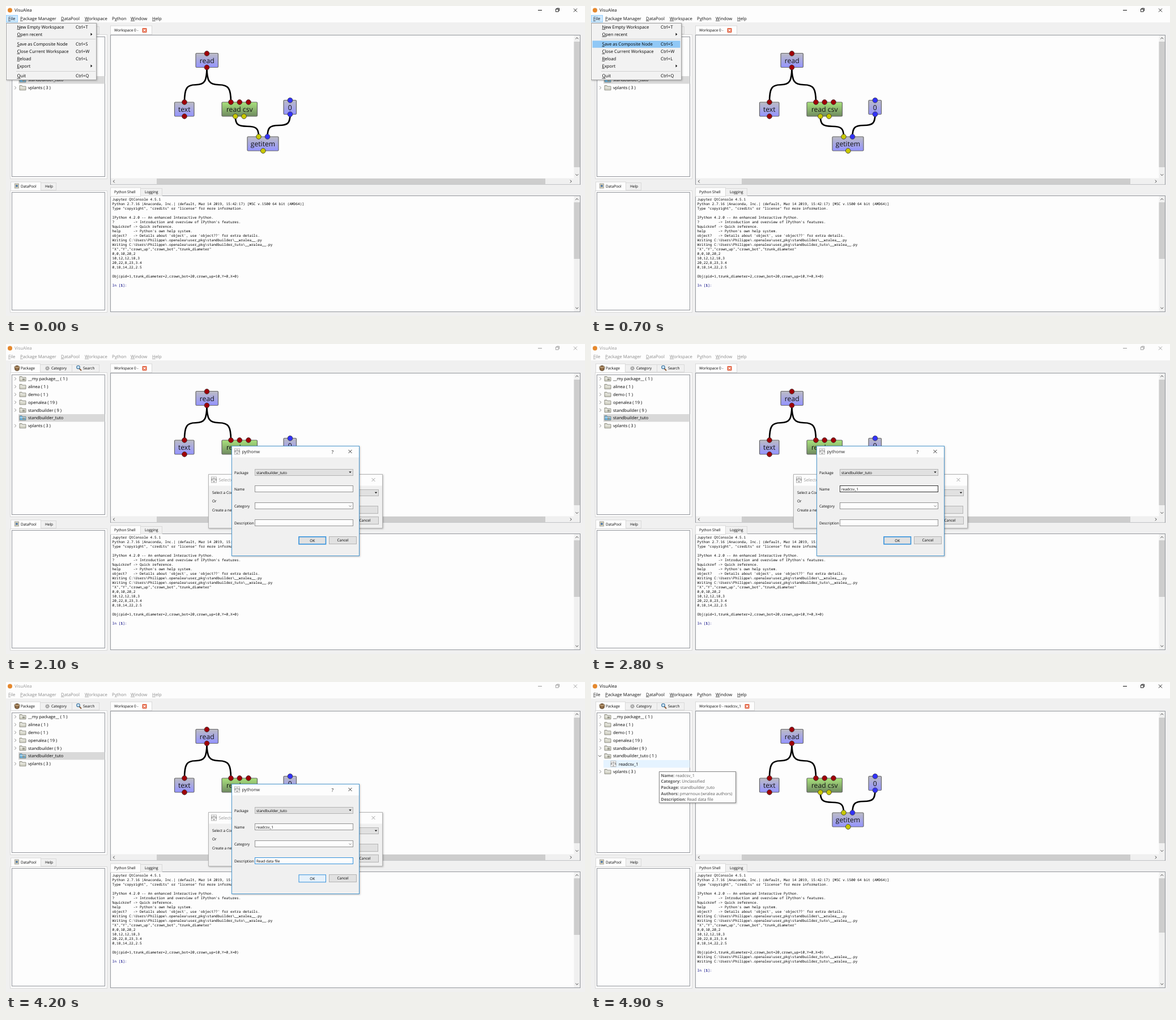
An HTML page that plays this animation: 1022 by 548 pixels, repeating every 5.6 s.

```html
<!DOCTYPE html>
<html lang="en">
<head>
<meta charset="utf-8">
<title>VisuAlea</title>
<style>
html, body { margin: 0; width: 100%; height: 100%; overflow: hidden; background: #f0f0f0; }
svg { display: block; }
text { font-family: "Open Sans", "Noto Sans", sans-serif; white-space: pre; text-rendering: geometricPrecision; }
.mono { font-family: "Noto Sans Mono", "DejaVu Sans Mono", monospace; }
.shadow { filter: drop-shadow(1px 1px 1.5px #0004); }
</style>
</head>
<body>
<svg id="stage" width="1022" height="548" viewBox="0 0 1022 548"></svg>
<script>
const STEP = 700, STEPS = 8;
const MENU = 7.75, SMALL = 6.5, TREE = 7.5, MONO = 6.21;
const BLUE = '#3592dc', GREY = '#b4b4b4', FIELD = '#929292', FRAME = '#92959b', WHITE = '#fdfdfd';

// Shape helpers; text is placed by its vertical centre, "&" underlines the next letter.
const rect = (x, y, w, h, fill, stroke = 'none', more = '') =>
  `<rect x="${x}" y="${y}" width="${w}" height="${h}" fill="${fill}" stroke="${stroke}" ${more}/>`;
const line = (d, stroke = '#333', width = 1, fill = 'none') =>
  `<path d="${d}" stroke="${stroke}" stroke-width="${width}" fill="${fill}"/>`;
const circle = (x, y, r, fill, more = '') => `<circle cx="${x}" cy="${y}" r="${r}" fill="${fill}" ${more}/>`;
const text = (x, y, s, size = SMALL, fill = '#000', more = '') =>
  `<text x="${x}" y="${y + size * .36}" font-size="${size}" fill="${fill}" ${more}>` +
  s.replace(/&(.)/, '<tspan text-decoration="underline">$1</tspan>') + '</text>';
const cross = (x, y, r, color = '#222', width = .9) =>
  line(`M${x - r} ${y - r}l${2 * r} ${2 * r}m0 ${-2 * r}l${-2 * r} ${2 * r}`, color, width);
const chevron = (x, y, angle, r = 2.4, color = '#444') =>
  `<g transform="translate(${x} ${y}) rotate(${angle})">${line(`M${-r / 2} ${-r}L${r / 2} 0L${-r / 2} ${r}`, color)}</g>`;
const caret = (x, y) => line(`M${x - 2.2} ${y - 1.2}h4.4l-2.2 2.5z`, 'none', 0, '#111');

const scales = (x, y) => rect(x - 4.5, y - 5, 9, 10, WHITE, '#999', 'stroke-width=".7"') +
  line(`M${x} ${y - 4}v7.5m-2 0h4M${x - 3.5} ${y - 2}h7l-1.3 3h2.6l-1.3-3m-7 0l-1 3h2.4z`, '#666', .6);
const folder = (x, y, tint, marked) =>
  line(`M${x} ${y + 4}v-8h4l1 1.5h6v6.5z`, '#77776b', .8, tint) + line(`M${x + .5} ${y - 1}h10`, '#fff', .8) +
  (marked ? rect(x + 5, y - .5, 4, 3, '#96968a') : '');

function titleBar(active, menuOpen) {
  const ink = active ? '#111' : '#999';
  const menu = active ? '#111' : '#8a8a8a';
  const items = [[4, '&File'], [25, '&Package Manager'], [97, '&DataPool'], [139, '&Workspace'],
    [187, 'P&ython'], [220, '&Window'], [258, '&Help']];
  return rect(0, 0, 1022, 29, WHITE) + circle(7, 7.5, 4, '#e5882d') + text(15, 7.5, 'VisuAlea', MENU, ink) +
    line('M939 7.5h7', ink) + rect(970.5, 5.5, 4.5, 4.5, 'none', ink, 'stroke-width=".9"') +
    line('M972 5V4h4.5v4.5h-1', ink, .9) + cross(1005, 7.5, 3, ink) +
    (menuOpen ? rect(.5, 16.5, 20, 12, '#cce8ff', '#99d1ff') : '') +
    items.map(([x, s]) => text(x, 22, s, MENU, menu)).join('');
}

const tab = (x, y, w, label, on, textX) =>
  rect(x, on ? y : y + 1.5, w, on ? 15.5 : 13, on ? WHITE : '#f0f0f0', '#d9d9d9') + text(textX, y + 8, label);
const pane = (x, y, w, h) => rect(x, y, w, h, '#fbfbfb', '#d9d9d9');
const frame = (x, y, w, h) => rect(x, y, w, h, WHITE, FRAME);

function tabs(saved) {
  const closeX = saved ? 275.5 : 244.5;
  return tab(60.5, 35, 56, 'Category', false, 80) + tab(116.5, 35, 48, 'Search', false, 136) +
    tab(8.5, 35, 52, 'Package', true, 26) +
    line('M15 40l4.5-2 4.5 2-1 6-3.5 1.5-3.5-1.5z', '#4a361e', .8, '#8f6c48') + line('M15 40l4.5 2 4.5-2', '#e5cfa6', 1) +
    circle(73, 43, 2.6, '#ccc', 'stroke="#888" stroke-width="2" stroke-dasharray="1.4 .8"') +
    line('M129 43l4 4', '#8a5a35', 1.8) + circle(127.5, 41, 2.8, '#cfe6f7', 'stroke="#356f9c" stroke-width="1.1"') +
    tab(184.5, 35, saved ? 104 : 73, saved ? 'Workspace 0 - readcsv_1' : 'Workspace 0 -', true, 191) +
    rect(closeX - 4, 39, 8, 8, '#e2603f', 'none', 'rx="1"') + cross(closeX, 43, 2, '#fff', 1.3) +
    tab(61.5, 311, 27, 'Help', false, 69) + tab(8.5, 311, 53, 'DataPool', true, 26) +
    rect(15.5, 314, 7, 8, '#d8d2b8', '#888', 'stroke-width=".7"') + circle(19, 318, 2, '#4d76a8') +
    tab(237.5, 321, 38, 'Logging', false, 245) + tab(184.5, 321, 53, 'Python Shell', true, 191);
}

function tree(saved) {
  const rows = ['__my package__ ( 1 )', 'alinea ( 1 )', 'demo ( 1 )', 'openalea ( 19 )', 'standbuilder ( 9 )',
    saved ? 'standbuilder_tuto ( 1 )' : 'standbuilder_tuto', 'vplants ( 3 )'];
  let out = saved ? rect(22, 138, 152.5, 13.5, '#e5f3ff') + scales(39.5, 144.8) + text(49, 144.8, 'readcsv_1', TREE)
    : rect(22, 124, 152.5, 13.5, '#d9d9d9');
  rows.forEach((label, i) => {
    const y = 61.5 + 13.85 * (saved && i > 5 ? i + 1 : i);
    const own = i == 0 || i == 4 || i == 5;
    if (i != 5) out += chevron(16.5, y, 0, 2.6, '#888');
    else if (saved) out += chevron(15.5, y, 90, 2.6);
    out += folder(24, y, i == 5 && !saved ? '#6cb2dd' : '#d6d6ca', own) + text(39, y, label, TREE);
  });
  return out;
}

function graph() {
  // Two mirrored bends that meet horizontally halfway.
  const edge = (x1, y1, x2, y2) => {
    const mx = (x1 + x2) / 2, my = (y1 + y2) / 2, dx = (mx - x1) * .2, dy = (my - y1) * .2;
    return line(`M${x1} ${y1}C${x1} ${my - dy} ${x1 + dx} ${my} ${mx} ${my}S${x2} ${my + dy} ${x2} ${y2}`, '#000', 2.7);
  };
  const node = (x, y, w, label, fill = 'url(#lilac)') => rect(x, y, w, 25, fill, '#666', 'rx="1.5" stroke-width="1.2"') +
    text(x + w / 2, y + 13, label, 12.2, '#111', 'text-anchor="middle"');
  const ports = (color, list) => list.map(([x, y]) => circle(x, y, 4.4, color, 'stroke="#333" stroke-width=".8"')).join('');
  return edge(354.5, 108.5, 315, 170) + edge(354.5, 108.5, 397, 170) +
    edge(404.8, 194.5, 446, 231) + edge(501.5, 191, 461.5, 231) +
    node(335, 83.5, 39.5, 'read') + node(297.5, 170, 34.5, 'text') + node(381, 170, 62.5, 'read csv', 'url(#green)') +
    node(490, 166.5, 22.5, '0') + node(426, 231, 55, 'getitem') +
    ports('#a00008', [[354.5, 84], [354.5, 108.5], [315, 170], [315, 195], [397, 170], [412.3, 170], [428, 170]]) +
    ports('#c8c800', [[404.8, 195], [420, 195], [446, 231], [453.8, 256]]) +
    ports('#3232ff', [[501.5, 166.7], [501.5, 191.3], [461.5, 231]]);
}

function consoleText(saved) {
  const home = 'Writing C:\\Users\\Philippe\\.openalea\\user_pkg\\standbuilder';
  const tuto = home + '_tuto\\__wralea__.py';
  const lines = ['Jupyter QtConsole 4.5.1',
    'Python 2.7.16 |Anaconda, Inc.| (default, Mar 14 2019, 15:42:17) [MSC v.1500 64 bit (AMD64)]',
    'Type "copyright", "credits" or "license" for more information.', '',
    'IPython 4.2.0 -- An enhanced Interactive Python.',
    '?         -> Introduction and overview of IPython\'s features.',
    '%quickref -> Quick reference.',
    'help      -> Python\'s own help system.',
    'object?   -> Details about \'object\', use \'object??\' for extra details.',
    home + '\\__wralea__.py', tuto, '"X","Y","crown_up","crown_bot","trunk_diameter"',
    '0,0,10,20,2', '10,12,12,18,3', '20,22,8,23,3.4', '0,18,14,22,2.5', '',
    'Obj(pid=1,trunk_diameter=2,crown_bot=20,crown_up=10,Y=0,X=0)', ...(saved ? [tuto, tuto] : []), ''];
  return lines.map((s, i) => text(187.5, 342 + 8 * i, s, MONO, '#000', 'class="mono"')).join('') +
    text(187.5, 342 + 8 * lines.length, 'In [<tspan font-weight="bold">1</tspan>]:', MONO, '#000080', 'class="mono"');
}

function mainWindow(active, saved, menuOpen) {
  return rect(0, 0, 1022, 548, '#f0f0f0') + titleBar(active, menuOpen) +
    pane(7.5, 50.5, 171, 255) + frame(10.5, 54.5, 164, 247) +
    pane(7.5, 326.5, 171, 215) + frame(10.5, 329.5, 164, 208) +
    frame(184.5, 51.5, 829, 264) + frame(184.5, 335.5, 829, 205) +
    tabs(saved) + tree(saved) + graph() +
    rect(1002.5, 52, 10.5, 252.5, '#f0f0f0') + rect(1002.5, 63, 10.5, 222, '#cdcdcd') +
    rect(185, 304.5, 828, 11, '#f0f0f0') + rect(266, 305, 686, 10.5, '#cdcdcd') +
    chevron(1007.8, 57, -90) + chevron(1007.8, 298.5, 90) + chevron(190.5, 310, 180) + chevron(997, 310, 0) +
    rect(1002.5, 336, 10.5, 204, '#f0f0f0') + rect(1002.5, 347, 10.5, saved ? 96 : 100, '#cdcdcd') +
    chevron(1007.8, 341.5, -90) + chevron(1007.8, 534, 90) + consoleText(saved);
}

function fileMenu(hover) {
  const items = [[37, '&New Empty Workspace', 'Ctrl+T'], [50, '&Open recent'], [67.5, '&Save as Composite Node', 'Ctrl+S'],
    [80.3, '&Close Current Workspace', 'Ctrl+W'], [93, '&Reload', 'Ctrl+L'], [106, '&Export'], [123.7, '&Quit', 'Ctrl+Q']];
  return rect(.5, 30.5, 159, 100, '#f2f2f2', '#a5a5a5', 'class="shadow"') +
    (hover ? rect(2.5, 61.3, 155, 12.5, '#90c8f6') : '') + line('M18 58.5h140M18 115.5h140', '#d0d0d0') +
    items.map(([y, label, key]) => text(19.5, y, label, MENU) +
      (key ? text(123, y, key, MENU) : line(`M149.5 ${y - 2.5}v5l2.8-2.5z`, 'none', 0, '#111'))).join('');
}

function dialog(x, y, w, h, title, active) {
  const ink = active ? '#222' : '#999';
  return rect(x, y, w, h, '#f0f0f0', active ? '#4c99d0' : '#b4b4b4', 'class="shadow"') +
    rect(x + .5, y + .5, w - 1, 19.5, WHITE) + scales(x + 9.5, y + 9.5) + text(x + 18, y + 10, title, MENU, ink) +
    text(x + w - 49, y + 10, '?', 8.5, ink) + cross(x + w - 16, y + 9.5, 3, ink);
}
// Button looks: plain, default (thick frame) or hovered.
const button = (x, y, w, label, look = 'plain') =>
  rect(x, y, w, 13, look == 'hover' ? '#e5f1fb' : '#e1e1e1', look == 'plain' ? GREY : BLUE, `stroke-width="${look == 'default' ? 1.6 : 1}"`) +
  text(x + w / 2, y + 6.5, label, SMALL, '#000', 'text-anchor="middle"');

const selector = active => dialog(357.5, 230.5, 307, 95, 'Selector', active) +
  text(364, 263, 'Select a Composite Node :') + rect(448.5, 257.5, 209, 11, '#e1e1e1', GREY) + caret(653, 263) +
  text(364, 277.5, 'Or') + text(364, 293.5, 'Create a new Composite Node') +
  button(513.5, 286.5, 143, 'New', active ? 'hover' : 'plain') +
  button(556, 305.3, 47.5, 'OK', 'default') + button(609.5, 305.5, 48, 'Cancel');

function nodeForm(step) {
  const field = (y, label, value, stroke = FIELD, fill = WHITE) => text(403, y + .2, label) +
    rect(439.5, y - 5.5, 173, 11, fill, stroke) + text(442, y + .2, value);
  return dialog(398.5, 180.5, 225, 194, 'pythonw', true) +
    field(227, 'Package', 'standbuilder_tuto', GREY, '#e1e1e1') + caret(607.5, 226.7) +
    field(256, 'Name', step > 3 ? 'readcsv_1' : '', step == 4 ? '#333' : FIELD) +
    field(286, 'Category', '') + chevron(607.5, 286.5, 90, 2, '#777') +
    field(316, 'Description', step > 4 ? 'Read data file' : '', step == 5 ? '#333' : step == 6 ? BLUE : FIELD) +
    button(517, 340.8, 47.5, 'OK', step == 6 ? 'hover' : 'default') + button(570.5, 340.5, 48, 'Cancel');
}

function tooltip() {
  const info = [['Name', 'readcsv_1'], ['Category', 'Unclassified'], ['Package', 'standbuilder_tuto'],
    ['Authors', 'pmarnoux (wralea authors)'], ['Description', 'Read data file']];
  return rect(120.5, 158.5, 135, 55, WHITE, '#888', 'class="shadow"') + info.map(([key, value], i) =>
    text(123.5, 165 + 10.7 * i, `<tspan font-weight="bold">${key}:</tspan> ${value}`, 7.3, '#5c5c5c')).join('');
}

const gradient = (id, top, bottom) => `<linearGradient id="${id}" x2="0" y2="1"><stop stop-color="${top}"/>` +
  `<stop offset="1" stop-color="${bottom}"/></linearGradient>`;
const defs = `<defs>${gradient('lilac', '#bcbcc4', '#9494ff')}${gradient('green', '#a9e27c', '#6f8a60')}</defs>`;

function scene(step) {
  const saved = step == 7, menuOpen = step < 2;
  return defs + mainWindow(menuOpen || saved, saved, menuOpen) +
    (menuOpen ? fileMenu(step == 1) : saved ? tooltip() : selector(step == 2) + (step > 2 ? nodeForm(step) : ''));
}

const stage = document.getElementById('stage');
let shown = -1;
function tick() {
  const step = Math.floor(performance.now() / STEP) % STEPS;
  if (step != shown) stage.innerHTML = scene(shown = step);
  requestAnimationFrame(tick);
}
tick();
</script>
</body>
</html>
```
